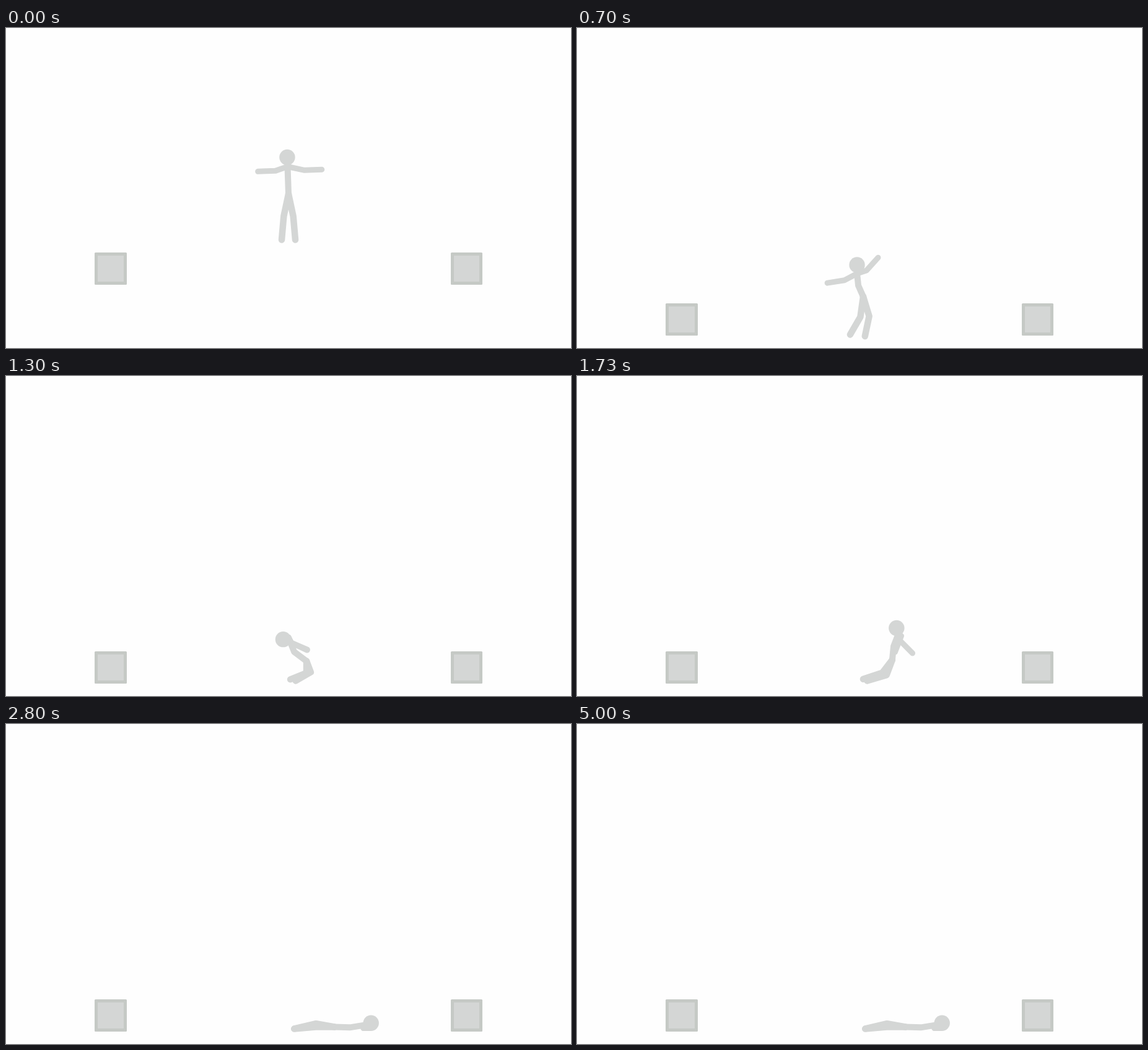
Write an HTML page with a canvas that moves like this. It is 912x516 px and loops after 5030 ms.

```html
<!DOCTYPE html>
<html lang="en">
<head>
<meta charset="utf-8">
<title>Ragdoll drop</title>
<style>
html, body { margin: 0; width: 100%; height: 100%; overflow: hidden; background: #fefefe; }
canvas { display: block; }
</style>
</head>
<body>
<canvas id="stage" width="912" height="516"></canvas>
<script>
const ctx = document.getElementById('stage').getContext('2d');
const LOOP = 5030, START = 341.5, FLOOR = 497, CRUMPLE = 700;
const SKIN = '#d4d6d5', EDGE = '#c5c9c5';

// Angles are in degrees, clockwise from the right, and may run past a full turn.
// trunk: lower spine, upper spine, neck; limbs: upper angle, lower angle.
// The other values are bone lengths as seen on the stage.
const STAND = {
  at: 0, ease: 1, x: 456, trunk: [-92, -92, -92],
  armL: [161, 178], armR: [12, -2], legL: [102, 95], legR: [78, 85],
  spine: 22, neck: 15, upperL: 21, upperR: 28, fore: 28, thigh: 37, shin: 38
};

// Each step changes only what moves on the way to it
const STEPS = [
  { at: 330, trunk: [-88, -92, -98], armL: [152, 171], armR: [-18, -44], upperL: 23, upperR: 16 },
  { at: 700, ease: 6, x: 462, trunk: [-114, -96, -90], armR: [-18, -48],
    legL: [98, 120], legR: [73, 102], spine: 19.5, neck: 14, thigh: 33, shin: 33 },
  { at: 1300, ease: 2, x: 485, trunk: [-143, -112, -201], armL: [61, 23], armR: [61, 25],
    legL: [90, 158], legR: [69, 150], spine: 25, neck: 9, upperL: 10, upperR: 10, thigh: 19, shin: 28 },
  { at: 2130, ease: 1, x: 531, trunk: [-30, -29, -24], armL: [20, 193], armR: [90, 64],
    legL: [162, 165], legR: [149, 176], spine: 19, neck: 10, upperL: 2, upperR: 14, thigh: 33, shin: 37 },
  { at: 2680, ease: 1.3, x: 530, trunk: [2, -9, -18], armL: [45, 362], armR: [120, 0],
    legL: [190, 167], legR: [180, 175], spine: 25, upperL: 4, upperR: 6, fore: 11, thigh: 30, shin: 35 }
];

const POSES = [STAND];
for (const step of STEPS) POSES.push({ ...POSES.at(-1), ...step });

const clamp = v => Math.min(1, Math.max(0, v));

function mix(a, b, u) {
  if (Array.isArray(a)) return a.map((v, i) => mix(v, b[i], u));
  return a + (b - a) * u;
}

function poseAt(t) {
  const k = Math.max(1, POSES.findIndex(p => p.at > t));
  const next = POSES.findIndex(p => p.at > t) < 0 ? POSES.length - 1 : k;
  const a = POSES[next - 1], b = POSES[next];
  const u = clamp((t - a.at) / (b.at - a.at)) ** b.ease;
  const pose = {};
  for (const key in a) pose[key] = mix(a[key], b[key], u);
  return pose;
}

function chain(from, angles, lengths) {
  const pts = [from];
  angles.forEach((deg, i) => {
    const [x, y] = pts[i], a = deg * Math.PI / 180;
    pts.push([x + Math.cos(a) * lengths[i], y + Math.sin(a) * lengths[i]]);
  });
  return pts;
}

function fall(ms, speed) {
  const s = ms / 1000;
  return speed * s + 293 * s * s;
}

// Free fall, then the feet flatten out as the doll crumples
function lowest(t) {
  return Math.min(START + fall(t, 42.6), FLOOR) - 5.5 * clamp((t - CRUMPLE) / 600);
}

function trace(pts, width) {
  ctx.lineWidth = width;
  ctx.beginPath();
  for (const p of pts) ctx.lineTo(...p);
  ctx.stroke();
}

function drawDoll(t) {
  const p = poseAt(t), hip = [p.x, 0];
  const trunk = chain(hip, p.trunk, [p.spine, p.spine, p.neck]);
  const arms = [
    chain(trunk[2], p.armL, [p.upperL, p.fore]),
    chain(trunk[2], p.armR, [p.upperR, p.fore])
  ];
  const legs = [p.legL, p.legR].map(angles => chain(hip, angles, [p.thigh, p.shin]));
  const bottom = Math.max(...[trunk, ...arms, ...legs].flat().map(q => q[1]));

  ctx.save();
  ctx.translate(0, lowest(t) - bottom);
  ctx.strokeStyle = ctx.fillStyle = SKIN;
  ctx.lineCap = ctx.lineJoin = 'round';
  trace(trunk, 10);
  for (const arm of arms) trace(arm, 9);
  for (const leg of legs) trace(leg, 10.5);
  ctx.beginPath();
  ctx.arc(...trunk[3], 12.7, 0, Math.PI * 2);
  ctx.fill();
  ctx.restore();
}

function drawBox(x, y, w) {
  ctx.fillStyle = EDGE;
  ctx.beginPath();
  ctx.roundRect(x, y, w, 52, 1.5);
  ctx.fill();
  ctx.fillStyle = SKIN;
  ctx.fillRect(x + 5, y + 5, w - 10, 42);
}

function draw(t) {
  ctx.fillStyle = '#fefefe';
  ctx.fillRect(0, 0, 912, 516);
  const y = Math.round(Math.min(362 + fall(t, 37), 444));
  drawBox(143, y, 52);
  drawBox(718, y, 51);
  drawDoll(t);
}

const start = performance.now();
function tick() {
  draw((performance.now() - start) % LOOP);
  requestAnimationFrame(tick);
}
tick();
</script>
</body>
</html>
```
